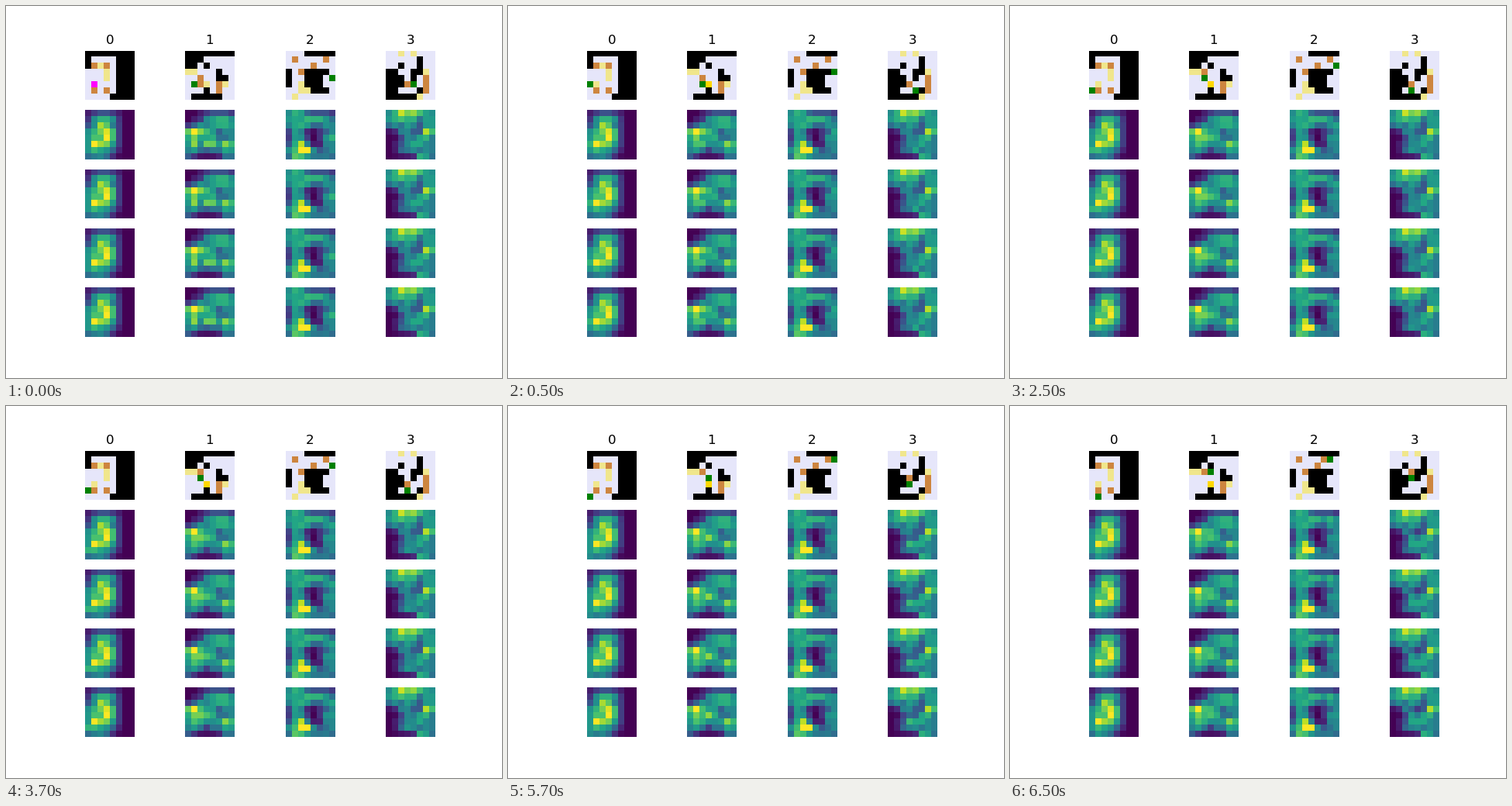
Animation of 640 by 480 pixels, one loop 8 s. Source, as an HTML page:

```html
<!DOCTYPE html>
<html lang="en">
<head>
<meta charset="utf-8">
<title>Box puzzles and heat maps</title>
<style>
  html, body { margin: 0; width: 100%; height: 100%; overflow: hidden; background: #fff; }
  svg { display: block; width: 100%; height: 100%; }
  text { font: 16.67px "DejaVu Sans", sans-serif; }
</style>
</head>
<body>
<svg id="stage" viewBox="0 0 640 480"></svg>
<script>
const N = 8, CELL = 8, ROWS = 5;
const LOOP = 8000, FIRST = 500, TURN = 2000;
const PANEL = { x: 102.05, y: 57.6, size: 63.72, dx: 129.39, dy: 76.47 };
const MOVES = { L: [-1, 0], R: [1, 0], U: [0, -1], D: [0, 1] };
const TILE = {
  wall: '#000000', floor: '#e6e6fa', goal: '#f0e68c', box: '#cd853f',
  player: '#008000', playerOnGoal: '#ff00ff', boxOnGoal: '#ffd700'
};
const VIRIDIS = ['#440154', '#482475', '#414487', '#355f8d', '#2a788e', '#21918c',
  '#22a884', '#44bf70', '#7ad151', '#bddf26', '#fde725'];

// How much the open cells around a cell warm it, row by row.
const OPEN = [[.02, .03, .02], [.08, .24, .07], [.08, .09, .08]];
const HEAT = {
  goal: { self: .28, left: .15, above: .08 },
  box: { self: -.12, left: -.12, above: -.04 },
  player: { self: .12, left: 0, above: 0 }
};

// Walls are x, y, width, height; all in cells.
const LEVELS = [
  {
    walls: [[0, 0, 8, 1], [0, 1, 1, 2], [5, 1, 3, 7], [4, 7, 1, 1]],
    goals: [[2, 2], [3, 3], [3, 4], [1, 5]],
    boxes: [[1, 2], [3, 2], [1, 6], [3, 6]],
    player: [1, 5], moves: 'LDDR'
  },
  {
    walls: [[0, 0, 8, 1], [0, 1, 3, 1], [0, 2, 2, 1], [3, 2, 1, 1], [5, 3, 1, 2],
      [6, 4, 1, 1], [3, 6, 1, 1], [1, 7, 5, 1]],
    goals: [[0, 3], [1, 3], [3, 5], [6, 5]],
    boxes: [[2, 4], [2, 5], [5, 5], [5, 6]],
    player: [1, 5], moves: 'RURU'
  },
  {
    walls: [[3, 0, 5, 1], [0, 3, 1, 3], [3, 3, 4, 1], [3, 4, 3, 2], [4, 6, 3, 1]],
    goals: [[2, 5], [2, 6], [3, 6], [1, 7]],
    boxes: [[1, 1], [6, 1], [4, 2], [2, 3]],
    player: [7, 4], moves: 'UUUL'
  },
  {
    walls: [[5, 1, 1, 3], [2, 2, 1, 1], [4, 3, 1, 2], [0, 3, 2, 5], [2, 4, 1, 2],
      [5, 6, 1, 1], [2, 7, 3, 1]],
    goals: [[2, 0], [4, 0], [6, 3], [5, 7]],
    boxes: [[3, 5], [6, 4], [6, 5], [6, 6]],
    player: [4, 5], moves: 'DLUU'
  }
];

const svg = document.getElementById('stage');
const same = (a, b) => a[0] === b[0] && a[1] === b[1];
const has = (list, p) => list.some(q => same(q, p));
const isWall = (level, [x, y]) =>
  level.walls.some(([a, b, w, h]) => x >= a && x < a + w && y >= b && y < b + h);
const isOpen = (level, [x, y]) =>
  x >= 0 && y >= 0 && x < N && y < N && !isWall(level, [x, y]);

function add(tag, attrs) {
  const el = document.createElementNS('http://www.w3.org/2000/svg', tag);
  for (const key in attrs) el.setAttribute(key, attrs[key]);
  return svg.appendChild(el);
}

// Walk the player through the first moves, pushing boxes ahead.
function play(level, turn) {
  let { player, boxes } = level;
  for (const key of level.moves.slice(0, turn)) {
    const step = ([x, y]) => [x + MOVES[key][0], y + MOVES[key][1]];
    player = step(player);
    boxes = boxes.map(b => same(b, player) ? step(b) : b);
  }
  return { player, boxes };
}

function tileColor(level, state, p) {
  const goal = has(level.goals, p);
  if (same(state.player, p)) return goal ? TILE.playerOnGoal : TILE.player;
  if (has(state.boxes, p)) return goal ? TILE.boxOnGoal : TILE.box;
  if (goal) return TILE.goal;
  return isWall(level, p) ? TILE.wall : TILE.floor;
}

function heatColor(level, state, [x, y]) {
  let heat = 0;
  OPEN.forEach((line, j) => line.forEach((weight, i) => {
    if (isOpen(level, [x + i - 1, y + j - 1])) heat += weight;
  }));
  const things = {
    goal: level.goals.filter(g => !has(state.boxes, g)),
    box: state.boxes,
    player: [state.player]
  };
  for (const kind in things) {
    const list = things[kind], gain = HEAT[kind];
    if (has(list, [x, y])) heat += gain.self;
    if (has(list, [x - 1, y])) heat += gain.left;
    if (has(list, [x, y - 1])) heat += gain.above;
  }
  return viridis(Math.max(0, Math.min(1, heat)));
}

function viridis(v) {
  const t = v * (VIRIDIS.length - 1);
  const i = Math.min(Math.floor(t), VIRIDIS.length - 2);
  const channel = (hex, k) => parseInt(hex.slice(1 + 2 * k, 3 + 2 * k), 16);
  const mix = [0, 1, 2].map(k => {
    const a = channel(VIRIDIS[i], k);
    return Math.round(a + (channel(VIRIDIS[i + 1], k) - a) * (t - i));
  });
  return `rgb(${mix})`;
}

const cells = [];
LEVELS.forEach((level, col) => {
  const x0 = PANEL.x + PANEL.dx * col;
  const left = Math.round(x0);
  const label = add('text', { x: Math.round(x0 + PANEL.size / 2 - 5.3), y: 49 });
  label.textContent = col;
  for (let row = 0; row < ROWS; row++) {
    const edge = PANEL.y + PANEL.dy * row;
    const top = Math.round(edge + PANEL.size) - N * CELL;
    for (let i = 0; i < N * N; i++) {
      const x = i % N, y = Math.floor(i / N);
      const y0 = Math.max(top + y * CELL, Math.round(edge));
      const el = add('rect', {
        x: left + x * CELL, y: y0, width: CELL, height: top + (y + 1) * CELL - y0,
        'shape-rendering': 'crispEdges'
      });
      cells.push({ el, level, p: [x, y], color: row ? heatColor : tileColor });
    }
  }
});

let shown = -1;
function draw(time) {
  const turn = Math.floor((time - FIRST) / TURN) + 1;
  if (turn === shown) return;
  shown = turn;
  const states = new Map(LEVELS.map(level => [level, play(level, turn)]));
  for (const { el, level, p, color } of cells) {
    el.setAttribute('fill', color(level, states.get(level), p));
  }
}

const start = performance.now();
function tick() {
  draw((performance.now() - start) % LOOP);
  requestAnimationFrame(tick);
}
tick();
</script>
</body>
</html>
```
